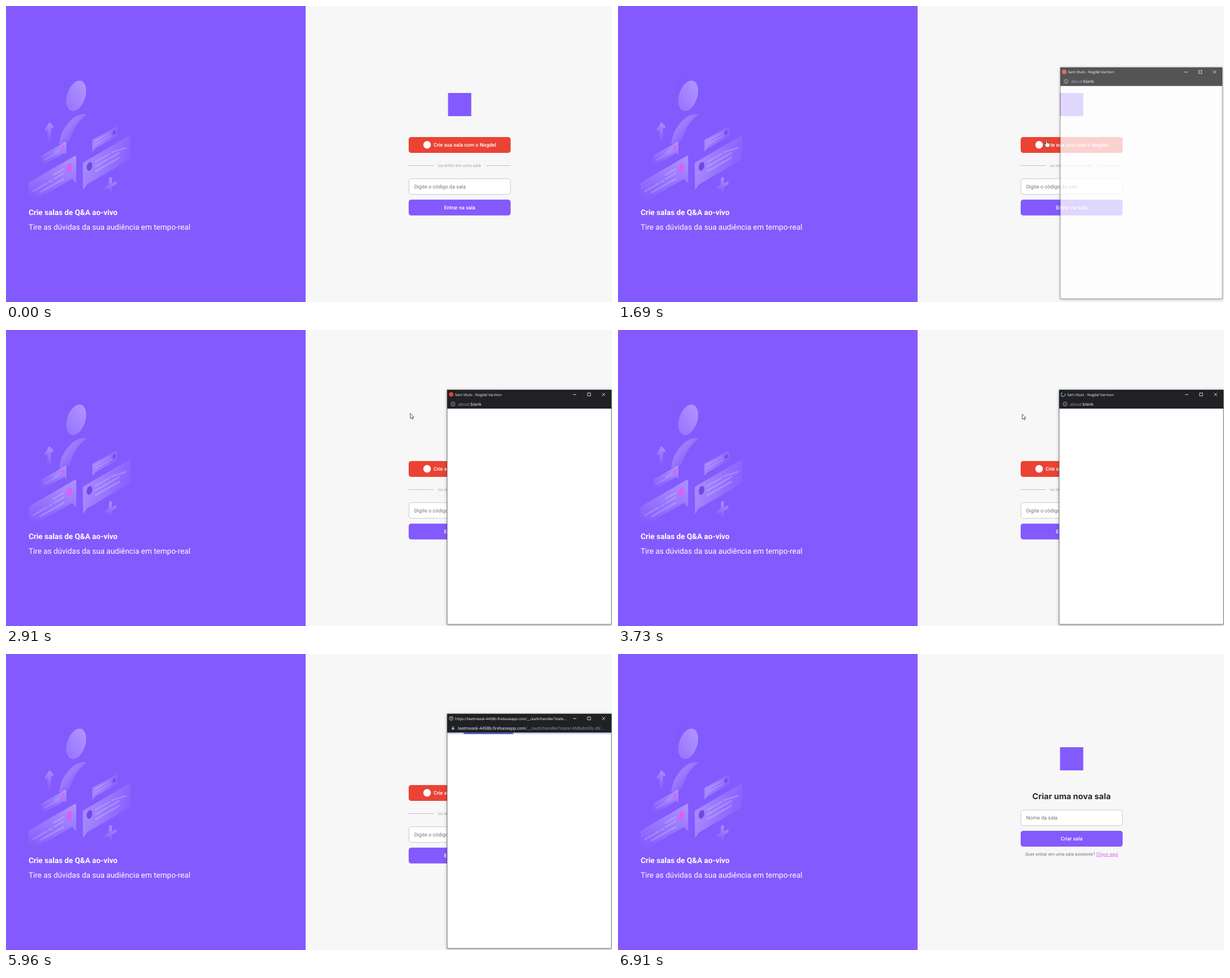
An HTML page for the animation above (8 s loop, 1070x524 px).

```html
<!DOCTYPE html>
<html lang="pt-BR">
<head>
<meta charset="utf-8">
<title>Sala de perguntas</title>
<style>
  html, body { margin: 0; width: 100%; height: 100%; overflow: hidden; background: #f7f7f7; }
  svg { display: block; width: 100vw; height: 100vh; }
  text { font-family: Roboto, sans-serif; font-size: 9px; text-rendering: geometricPrecision; white-space: pre; }
  .lead { font-size: 13.49px; fill: #fff; }
  .btn { font-weight: 500; fill: #fff; text-anchor: middle; }
  .hint { fill: #757575; }
  .small { font-size: 7.87px; }
  .head { font: 700 14.4px Inter, sans-serif; fill: #29292e; text-anchor: middle; }
  #popup text { font-family: "Open Sans", sans-serif; fill: #fff; }
  #popup .title { font-size: 6.4px; }
  #popup .url { font-size: 7.45px; }
  #popup .dim { fill: #9aa0a6; }
  .field { fill: #fff; stroke: #a8a8b3; stroke-width: .6; }
  .line { fill: none; stroke: #fff; stroke-width: .8; }
  .bars { stroke: #fff; stroke-opacity: .2; stroke-width: 2.6; stroke-linecap: round; }
</style>
</head>
<body>
<svg viewBox="0 0 1070 524" preserveAspectRatio="none">
  <defs>
    <linearGradient id="fadeDown" x1=".6" y1="0" x2=".35" y2="1">
      <stop offset="0" stop-color="#fff" stop-opacity=".32"/>
      <stop offset="1" stop-color="#fff" stop-opacity="0"/>
    </linearGradient>
    <linearGradient id="fadeRight" x1="0" y1=".5" x2="1" y2=".8">
      <stop offset="0" stop-color="#fff" stop-opacity=".3"/>
      <stop offset="1" stop-color="#fff" stop-opacity="0"/>
    </linearGradient>
    <linearGradient id="skin" x1=".7" y1="0" x2=".3" y2="1">
      <stop offset="0" stop-color="#b095ff"/>
      <stop offset="1" stop-color="#9774ff"/>
    </linearGradient>
    <linearGradient id="soft" x1="0" y1="0" x2="1" y2=".6">
      <stop offset="0" stop-color="#6f45ec" stop-opacity=".2"/>
      <stop offset="1" stop-color="#9a7aff" stop-opacity=".1"/>
    </linearGradient>
    <linearGradient id="torso" x1=".1" y1=".1" x2=".75" y2=".7">
      <stop offset="0" stop-color="#6f45ec" stop-opacity=".2"/>
      <stop offset=".42" stop-color="#fff" stop-opacity=".22"/>
      <stop offset="1" stop-color="#fff" stop-opacity="0"/>
    </linearGradient>
  </defs>

  <rect width="1070" height="524" fill="#f7f7f7"/>
  <rect width="529" height="524" fill="#835afd"/>

  <g id="art">
    <ellipse cx="115" cy="151" rx="16" ry="28" transform="rotate(18 115 151)" fill="url(#soft)"/>
    <ellipse cx="124" cy="159" rx="16" ry="28" transform="rotate(18 124 159)" fill="url(#skin)"/>
    <path d="M143 192C120 188 97 214 94 245L107 243L113 237C118 217 130 201 143 192Z" fill="url(#torso)"/>
    <path d="M76.5 205.5L84 213Q83 217 79.5 216V236Q75 241 73 238V219.5Q68 224 68 219Z" fill="url(#fadeDown)"/>

    <path d="M62.5 266Q62.5 264.500 64 263.700L104 241Q106.500 240 106.500 242.500V264L103 260L62.500 284Z" fill="url(#fadeDown)"/>
    <path d="M84 260L95 253.500M68 272.500L95 257.500" class="bars" style="stroke-width:1.6"/>
    <ellipse cx="100.500" cy="250" rx="2.200" ry="3.600" transform="rotate(15 100.500 250)" fill="#df5cf5"/>

    <path d="M152.500 239Q152.500 237 154 236L194 214Q197 212.500 197 215.500V230L158 252L152.500 258Z" fill="url(#fadeRight)"/>
    <path d="M158 245L186 229M158 239L184 224.500" class="bars" style="stroke-width:1.600"/>
    <ellipse cx="191" cy="224" rx="2.300" ry="3.800" transform="rotate(15 191 224)" fill="#7048e6"/>

    <path d="M40 315Q40 312.500 42 311.500L120 266Q124 263.500 124 268V314.500L117 306L40 350Z" fill="url(#fadeDown)"/>
    <path d="M84 299L102 288.500M84 306.500L102 296M48 328L72 314M60 330L102 306M76 312L80 309.500" class="bars"/>
    <ellipse cx="112" cy="286" rx="4.500" ry="7.800" transform="rotate(15 112 286)" fill="#df5cf5"/>

    <path d="M135.500 280Q135.500 277.500 138 276L216 230.500Q220 228 220 233V266Q220 271 216 273L143 316L136 325.500Z" fill="url(#fadeRight)"/>
    <path d="M158 276L183 261.500M187 259L212 251M158 284L200 260M158 292.500L200 268.500" class="bars"/>
    <ellipse cx="147.500" cy="284" rx="4.700" ry="7.800" transform="rotate(15 147.500 284)" fill="#7048e6"/>

    <path d="M181.500 306Q184 301 187 304V314L194 310.500Q197 313 193.500 316.500L187 320V329Q184 334 181.500 331V323L176 326Q172 324 175 320L181.500 316Z" fill="url(#fadeDown)"/>
  </g>
  <text class="lead" x="40" y="370" font-weight="700">Crie salas de Q&amp;A ao-vivo</text>
  <text class="lead" x="40" y="395.600">Tire as dúvidas da sua audiência em tempo-real</text>

  <g id="join">
    <rect x="780.500" y="154" width="41" height="41" fill="#835afd"/>
    <rect x="711" y="232" width="180" height="28" rx="4.500" fill="#ea4335"/>
    <circle cx="743.500" cy="245.700" r="6.700" fill="#fff"/>
    <text class="btn" x="755" y="248.900" style="text-anchor:start">Crie sua sala com o Nogdel</text>
    <path d="M711 282.500H755M848 282.500H891" stroke="#a8a8b3" stroke-width=".7"/>
    <text class="small" x="763" y="285.400" fill="#a8a8b3">ou entre em uma sala</text>
    <rect class="field" x="711.400" y="305.700" width="179.300" height="27.700" rx="4.500"/>
    <text class="hint" x="720.700" y="322.700">Digite o código da sala</text>
    <rect x="711" y="342.700" width="180" height="28" rx="4.500" fill="#835afd"/>
    <text class="btn" x="801" y="359.800">Entrar na sala</text>
  </g>

  <g id="create">
    <rect x="780.500" y="165" width="41" height="41" fill="#835afd"/>
    <text class="head" x="800.800" y="257.300">Criar uma nova sala</text>
    <rect class="field" x="711.400" y="276.200" width="179.300" height="27.700" rx="4.500"/>
    <text class="hint" x="720.700" y="293.200">Nome da sala</text>
    <rect x="711" y="313" width="180" height="28" rx="4.500" fill="#835afd"/>
    <text class="btn" x="801" y="330.200">Criar sala</text>
    <text class="small" x="718.700" y="357.200" fill="#737380">Quer entrar em uma sala existente? <tspan fill="#e559f9" text-decoration="underline">Clique aqui</tspan></text>
  </g>

  <g id="popup">
    <rect x="779" y="106" width="290" height="415" fill="#fff" stroke="#606164" stroke-width=".8" style="filter:drop-shadow(0 1px 2.500px rgba(0,0,0,.35))"/>
    <rect x="779" y="106" width="290" height="33.200" fill="#202124"/>
    <circle id="favicon" cx="786" cy="114" r="4" fill="#db4437"/>
    <path id="spinner" d="M786 110.500A3.500 3.500 0 1 1 782.500 114" fill="none" stroke="#8ab4f8" stroke-width="1.100"/>
    <g id="globe" class="line" style="stroke:#c4c7cb">
      <circle cx="786" cy="114" r="3.500"/>
      <path d="M783 112.300L786 113.500L785.500 116L787 117M786 110.700L787 112.800L789.300 113.500"/>
    </g>
    <text id="title" class="title" x="793" y="116.500"></text>
    <path class="line" d="M1001 114.300H1007M1026.900 111.500H1032.100V116.700H1026.900ZM1052.500 111.500L1057.800 116.800M1057.800 111.500L1052.500 116.800"/>
    <g id="info" class="line" style="stroke:#bdc1c6">
      <circle cx="789.300" cy="131" r="3.500"/>
      <path d="M789.300 130.400V133M789.300 128.900V129.700"/>
    </g>
    <g id="lock">
      <rect x="787" y="130.300" width="4.600" height="3.600" rx=".5" fill="#9aa0a6"/>
      <path class="line" style="stroke:#9aa0a6" d="M788 130.300V129.200A1.300 1.300 0 0 1 790.600 129.200V130.300"/>
    </g>
    <text class="url" x="798" y="133.700"><tspan id="pre" class="dim"></tspan><tspan id="host"></tspan><tspan id="rest" class="dim"></tspan></text>
    <g id="progress">
      <rect x="779.400" y="139.200" width="289.200" height="2.500" fill="#c5cae9"/>
      <rect id="bar" y="139.200" height="2.500" fill="#3f51b5"/>
    </g>
  </g>

  <g id="cursor" stroke="#111" stroke-width=".7" stroke-linejoin="round">
    <path id="arrow" fill="#fff" d="M0 0V9.300L2.200 7.300L3.600 10.400L5 9.800L3.700 6.800H6.500Z"/>
    <path id="hand" fill="#fff" d="M0 1C0 -.6 2.200 -.6 2.200 1V5L5.600 5.800Q6.800 6.200 6.700 7.500V10Q6.700 11.600 5.800 13.200H1L-2.600 8.700Q-3.200 7.300 -1.800 7L0 8.300Z"/>
    <path id="beam" fill="none" d="M-2 -4.500H2M0 -4.500V4.500M-2 4.500H2"/>
  </g>
</svg>
<script>
const LOOP = 8000;
const el = {};
document.querySelectorAll('[id]').forEach(n => { el[n.id] = n; });

const clamp = v => Math.max(0, Math.min(1, v));
const span = (t, a, b) => clamp((t - a) / (b - a));
const smooth = u => u * u * (3 - 2 * u);
const show = (id, on) => { el[id].style.display = on ? '' : 'none'; };
const put = (id, s) => { if (el[id].textContent !== s) el[id].textContent = s; };

// time, x, y of the pointer tip
const PATH = [
  [120, 982, 478], [660, 735, 224], [870, 752, 236], [950, 752, 236], [1000, 755.3, 237],
  [2160, 755.3, 237], [2830, 713.8, 147.5], [3190, 713.8, 147.5], [3900, 713.8, 149],
  [4890, 713.8, 149], [5050, 713.8, 154], [5300, 713.8, 154]
];
const HOST = 'leatmeask-4458b.firebaseapp.com';
const PAGES = [
  { at: 0, title: 'Sem título - Nogdel Varmon', pre: 'about:', host: 'blank', rest: '' },
  { at: 4130, title: `https://${HOST}/__/auth/handler?apiKe...`, pre: '', host: HOST, rest: '/__/auth/handler?apiKey=AIzaSyCGSWk...' },
  { at: 5000, title: `https://${HOST}/__/auth/handler?state...`, pre: '', host: HOST, rest: '/__/auth/handler?state=AMbdmDlc-dV...' }
];
const SPIN = 3190, OPEN = 1500, CLOSE = 6530, BAR = 5560, NEXT = 6740;

function pointer(t) {
  const i = PATH.findIndex(p => p[0] > t);
  if (i < 1) return null;
  const a = PATH[i - 1], b = PATH[i], u = smooth(span(t, a[0], b[0]));
  return [a[1] + (b[1] - a[1]) * u, a[2] + (b[2] - a[2]) * u];
}

function drawPointer(t) {
  const p = pointer(t);
  show('cursor', p);
  if (!p) return;
  const [x, y] = p;
  const within = (top, bottom) => x > 711 && x < 891 && y > top && y < bottom;
  const hand = within(232, 260) || within(343, 371);
  const beam = within(306, 333);
  show('hand', hand);
  show('beam', beam);
  show('arrow', !hand && !beam);
  el.cursor.setAttribute('transform', `translate(${x} ${y})`);
}

function drawPopup(t) {
  const on = t >= OPEN && t < CLOSE + 160;
  show('popup', on);
  if (!on) return;
  const grow = span(t, OPEN, OPEN + 280), leave = span(t, CLOSE, CLOSE + 160);
  const alpha = smooth(clamp(grow * 1.04 - .03)) * (1 - leave);
  const scale = 1 - .057 * (1 - smooth(grow)) - .06 * leave;
  el.popup.setAttribute('opacity', alpha);
  el.popup.setAttribute('transform', `translate(924 313.5) scale(${scale}) translate(-924 -313.5)`);

  const page = PAGES.filter(p => t >= p.at).pop();
  ['title', 'pre', 'host', 'rest'].forEach(k => put(k, page[k]));
  const blank = page === PAGES[0], done = page === PAGES[2];
  show('info', blank);
  show('lock', !blank);
  show('favicon', t < SPIN);
  show('spinner', t >= SPIN && !done);
  show('globe', done);
  el.spinner.setAttribute('transform', `rotate(${(t - 4540) * .36} 786 114)`);

  show('progress', t >= BAR);
  const u = span(t, BAR, BAR + 1000);
  el.bar.setAttribute('x', 779.4 + 289.2 * .25 * u);
  el.bar.setAttribute('width', 289.2 * .75 * u);
}

function draw(t) {
  show('join', t < NEXT);
  show('create', t >= NEXT);
  drawPopup(t);
  drawPointer(t);
}

function tick() {
  draw(performance.now() % LOOP);
  requestAnimationFrame(tick);
}
tick();
</script>
</body>
</html>
```
